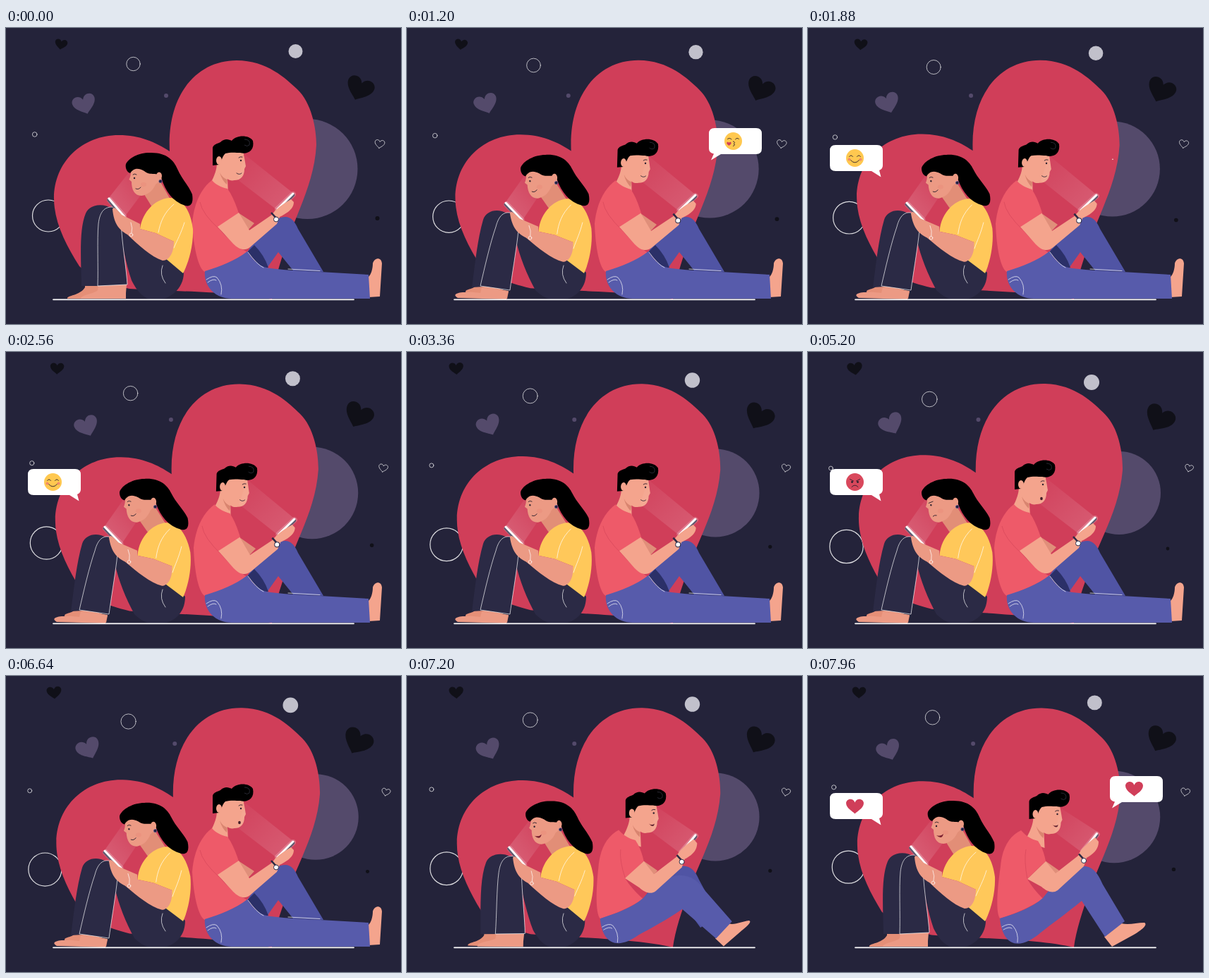
These frames come from a looping animation (560x420 px, 8 s). An HTML page:

```html
<!DOCTYPE html>
<html lang="en">
<head>
<meta charset="utf-8">
<title>Chatting couple</title>
<style>
  html, body { margin: 0; width: 100%; height: 100%; overflow: hidden; background: #24233a; }
  svg { display: block; width: 100vw; height: 100vh; }
  .line { fill: none; stroke: #fff; stroke-width: .8; stroke-linecap: round; stroke-opacity: .85; }
  .ink { fill: none; stroke: #2a1f2d; stroke-width: .9; stroke-linecap: round; }
  .skin { fill: #f4a48d; }
  .tan { fill: #ec9a84; }
  .navy { fill: #2b2a45; }
  .shirt { fill: #ee5a69; }
  .jeans { fill: #575bab; }
  .glow { stroke: #fff; stroke-width: 8; stroke-linecap: round; opacity: .22; }
  .edge { stroke: #615a70; stroke-width: 4.5; stroke-linecap: round; }
  .screen { stroke: #fff; stroke-width: 3; stroke-linecap: round; }
</style>
</head>
<body>
<svg viewBox="0 0 560 420">
  <defs>
    <path id="heart" d="M0 13C-4 9 -16 3 -16 -6C-16 -14 -4 -17 0 -7.500C4 -17 16 -14 16 -6C16 3 4 9 0 13Z"/>
    <linearGradient id="beamL" x1="0" y1="1" x2="1" y2="0">
      <stop offset=".2" stop-color="#fff" stop-opacity=".16"/><stop offset="1" stop-color="#fff" stop-opacity=".02"/>
    </linearGradient>
    <linearGradient id="beamR" x1="1" y1="1" x2="0" y2="0">
      <stop offset=".1" stop-color="#fff" stop-opacity=".15"/><stop offset="1" stop-color="#fff" stop-opacity=".02"/>
    </linearGradient>
    <circle id="face" r="12.500" fill="#ffc850"/>
  </defs>
  <rect width="560" height="420" fill="#24233a"/>

  <g id="drift"></g>
  <path id="bigHeart" fill="#d03e59" d="M232 175C228 95 270 46 327 46C370 46 397 72 413 87C433 106 440 142 440 166C437 220 412 262 398 305C388 335 380 360 377 385C330 374 240 374 175 370C140 362 118 352 104 338C85 308 68 275 68 242C68 190 108 152 160 152C190 152 212 162 232 175Z"/>

  <g id="man">
    <path id="farLeg" fill="#5054a4"/>
    <path id="legShade" fill="#2b3068" d="M342 318L352 308Q366 322 372 340L362 340Q352 330 342 318Z"/>
    <g id="manTop">
      <g id="manHead">
        <path class="skin" d="M305 174L336 174C338 184 339 190 340 196L338 200C338 210 333 216 324 216C320 217 316 216 314 214L315 236L287 226C297 208 299 200 299 190Z"/>
        <path fill="#d98570" d="M303 205Q307 213 314 215L313 222Q306 216 303 205Z"/>
        <path d="M293 195L293 170C294 165 300 164 304 162C310 156 316 158 320 160C326 152 344 151 350 160C353 174 342 180 332 177C326 177 318 176 311 178C306 182 306 190 302 194Z"/>
        <ellipse class="skin" cx="302" cy="188" rx="4" ry="6"/>
        <path d="M338 158Q347 158 345 166Q342 169 338 166" fill="none" stroke="#3a3a48" stroke-width=".7"/>
        <circle cx="333" cy="188" r="1.200" fill="#2a1f2d"/>
        <path class="ink" d="M330 184Q332 182 335 183"/>
        <path id="manSmile" class="ink" d="M327 206Q331 209 334 206"/>
        <ellipse id="manGasp" cx="331" cy="208" rx="1.800" ry="2.200" fill="#3a1520"/>
        <path id="manLaugh" fill="#5a1a28" d="M326 203Q330 206 334 203Q333 210 326 203Z"/>
      </g>
      <path id="farArm" fill="#e08f7a"/>
      <path id="shirt" class="shirt"/>
      <path id="sleeve" fill="none" stroke="#d94a5c" stroke-width=".8"/>
    </g>
    <path id="foot" class="skin"/>
    <path id="nearLeg" class="jeans"/>
    <path id="pocket" class="line"/>
    <path id="legLines" class="line" d="M343 318Q356 336 365 340M400 342L445 344.500"/>
    <g id="manArm">
      <path id="manBeam" fill="url(#beamR)"/>
      <g id="manPhone">
        <path class="glow" d="M385 257L407 236"/>
        <path class="edge" d="M386.500 258.500L407 237"/>
        <path class="screen" d="M385 257L407 235"/>
      </g>
      <path id="nearArm" class="skin"/>
      <g id="watch">
        <path d="M376 262L386 273" stroke="#2b2a45" stroke-width="2.600"/>
        <circle cx="383" cy="271.500" r="3.500" fill="#fff" stroke="#2b2a45"/>
      </g>
    </g>
  </g>

  <g id="girl">
    <path id="farFoot" fill="#e58f77"/>
    <path id="farShin" class="navy"/>
    <path id="nearFoot" class="tan"/>
    <path id="thigh" class="navy"/>
    <path id="nearShin" class="navy" stroke="#fff" stroke-width=".8" stroke-opacity=".85"/>
    <path class="line" d="M222 337Q217 350 226 362"/>
    <g id="girlTop">
      <path fill="url(#beamL)" d="M145 242L168 268L192 236L175 204Z"/>
      <path fill="#e28e77" d="M194 233L216 213L234 245L207 254Z"/>
      <path class="tan" d="M177 200C177 207 177 210 174.500 215L178 218C178 229 182 238 192 238C201 237 208 231 212 222L224 212L215 198Z"/>
      <path fill="#ffc85a" d="M190 285C193 262 210 243 232 241C252 241 262 262 265 285C266 310 258 335 251 348L225 326L238 303L212 291Z"/>
      <path class="line" d="M238 250C224 262 219 275 216 290M253 276C248 292 243 300 238 312"/>
      <g>
        <path class="glow" d="M147 244L167 267"/>
        <path class="edge" d="M145.500 244L166 268"/>
        <path class="screen" d="M146 242L168 268"/>
      </g>
      <path class="tan" d="M151 257C153 252 158 258 164 265L190 278L190 285L212 291L238 303C238 318 232 330 222 330C206 325 188 308 172 293C160 286 153 278 151 257Z"/>
      <path class="line" d="M177 276Q180 284 178 291"/><circle class="line" cx="177.500" cy="293.500" r="2.300"/>
      <path d="M176 206C170 204 169 196 170 193C174 184 190 176 206 177C228 177 238 188 243 200C249 214 258 222 264 236C266 249 262 254 254 252C236 246 226 232 220 212C215 203 205 211 196 203C186 197 180 200 176 206Z"/>
      <ellipse class="tan" cx="217" cy="210" rx="4" ry="5.500"/>
      <circle cx="219" cy="217.500" r="2.200" fill="#24233a" stroke="#575bab" stroke-width=".6"/>
      <circle cx="182" cy="213" r="1.200" fill="#2a1f2d"/>
      <ellipse cx="195" cy="222" rx="4" ry="3" fill="#e8806f" opacity=".25"/>
      <path id="girlBrow" class="ink" d="M180 208Q182 206 185 208"/>
      <path id="girlCross" class="ink" d="M179 210L185 208"/>
      <path id="girlSmile" class="ink" stroke="#a33b45" d="M184 228Q188 230 191 226"/>
      <path id="girlFlat" class="ink" d="M184 229Q186 227 189 228"/>
      <path id="girlLaugh" fill="#7a1f30" d="M182 226Q188 228 192 224Q190 233 182 226Z"/>
    </g>
  </g>

  <path d="M67 385.300H493" stroke="#fff" stroke-width="1.800" stroke-linecap="round"/>

  <g id="leftBubble">
    <path fill="#fff" d="M39 166H98Q106 166 106 174V195Q106 200 101 202L103.500 211.500L90 203H39Q31 203 31 195V174Q31 166 39 166Z"/>
    <g transform="translate(66.500 184.500)">
      <g id="happy">
        <use href="#face"/>
        <path class="ink" d="M-8 -2Q-5.500 -5.500 -3 -2M3 -2Q5.500 -5.500 8 -2M-6 3Q0 10 6 3"/>
        <circle cx="-8" cy="2" r="2" fill="#f28a68"/><circle cx="8" cy="2" r="2" fill="#f28a68"/>
      </g>
      <g id="angry">
        <circle r="12.500" fill="#d9485c"/>
        <path class="ink" d="M-7 -4L-2 -1.500M7 -4L2 -1.500M-4.500 7Q0 2 4.500 7"/>
        <circle cx="-4" cy="0" r="1.400" fill="#2a1f2d"/><circle cx="4" cy="0" r="1.400" fill="#2a1f2d"/>
      </g>
      <use id="loveL" href="#heart" y="1" transform="scale(.78)" fill="#d03e59"/>
    </g>
  </g>
  <g id="rightBubble">
    <path fill="#fff" d="M436 142H495Q503 142 503 150V171Q503 179 495 179H445L431 187.500L435 178.500Q428 177 428 171V150Q428 142 436 142Z"/>
    <g transform="translate(462.500 160.500)">
      <g id="kiss">
        <use href="#face"/>
        <path class="ink" d="M-8 -3Q-5 -5.500 -2.500 -2.500M3 -2.500Q5.500 -5.500 8 -3M0 0.500Q4 1.500 0.500 4Q4 5 0 7"/>
        <use href="#heart" transform="translate(-6 4) scale(.2)" fill="#d03e59"/>
      </g>
      <use id="loveR" href="#heart" transform="scale(.78)" fill="#d03e59"/>
    </g>
  </g>
</svg>
<script>
const LOOP = 8000, DRIFT = 5280;
const $ = id => document.getElementById(id);
const lerp = (a, b, k) => a + (b - a) * k;
const ramp = (t, from, to) => {
  const k = Math.min(1, Math.max(0, (t - from) / (to - from)));
  return k * k * (3 - 2 * k);
};
const show = (id, on) => { $(id).style.display = on ? '' : 'none'; };
const number = /-?\d+(\.\d+)?/g;
function mix(a, b, k) {
  const end = b.match(number);
  let i = 0;
  return a.replace(number, v => lerp(+v, +end[i++], k).toFixed(2) + ' ');
}

// Floating shapes: tag, paint, then [x, y, size, angle] at each end of the drift
const floaters = [
  ['circle', 'fill="#544a6b"', [427.5, 200, 71, 0], [441, 200, 59, 0]],
  ['circle', 'fill="#c1c0cb"', [410.5, 33, 10, 0], [402, 43, 11, 0]],
  ['circle', 'fill="#544a6b"', [227, 96, 3, 0], [241.5, 96, 3, 0]],
  ['circle', 'fill="#101018"', [526.5, 270, 3, 0], [510, 279, 2.4, 0]],
  ['circle', 'class="line"', [180.5, 51, 9.7, 0], [172.3, 67, 10.8, 0]],
  ['circle', 'class="line"', [40.7, 151, 3.3, 0], [32.4, 165, 2.9, 0]],
  ['circle', 'class="line" style="stroke-width:1.2"', [60, 266.5, 22.5, 0], [54.5, 276, 23.7, 0]],
  ['heart', 'fill="#101018"', [78, 23.5, .55, 10], [66.5, 24, .67, -8]],
  ['heart', 'fill="#101018"', [501, 87, 1.23, 22], [497.5, 95.5, 1.33, 28]],
  ['heart', 'fill="#544a6b"', [111.5, 109, 1.03, -18], [118.5, 103, 1.08, -26]],
  ['heart', 'class="line" vector-effect="non-scaling-stroke"', [529.7, 164.8, .43, 8], [540.2, 165, .37, 14]],
];
const heartPath = $('heart').getAttribute('d');
$('drift').innerHTML = floaters.map(([tag, paint]) =>
  tag === 'circle' ? `<circle ${paint}/>` : `<path d="${heartPath}" ${paint}/>`).join('');

// Girl: knees up, then feet slid forward
const girlPoses = {
  farShin: ['M107 366C106 320 104 285 113 263C118 250 138 248 150 256L158 300L140 366Z',
    'M92 368C97 330 100 300 108 272C112 259 128 255 142 263L155 300L125 366Z'],
  nearShin: ['M130 366C131 340 129 300 131 278C133 260 140 254 150 254C160 256 162 270 164 290C166 315 171 345 172 364Z',
    'M104 366C110 340 118 305 126 282C130 266 138 259 149 263C158 270 159 280 157 296C154 320 149 350 146 372Z'],
  thigh: ['M138 258C150 250 162 262 175 278L252 347C252 370 232 386 212 386C196 386 186 374 178 358C170 335 166 310 160 285Z',
    'M134 266C146 256 160 268 172 282L254 347C254 372 236 386 214 386C200 386 190 380 182 372C170 350 160 325 154 300Z'],
  farFoot: ['M112 357L131 360L131 378L130 384L87 384C86 379 105 380 112 368Z',
    'M98 359L106 362L144 374L142 384L84 376C80 370 92 372 97 366Z'],
  nearFoot: ['M131 365L171 364L170 376L170 384L106 384C107 378 124 378 130 372Z',
    'M106 368L144 373L142 379L141 385L72 383C60 376 80 373 104 376Z'],
};
// Man: leg stretched out, then knee bent
const manPoses = {
  farLeg: ['M342 318C360 290 378 268 396 268C404 268 410 275 414 285L450 346L407 344L386 318L369 342Z',
    'M333 316C352 290 368 272 388 270C402 269 409 278 414 290L440 340L418 360L388 318L350 340Z'],
  nearLeg: ['M282 345C305 338 325 330 342 317C352 332 362 340 375 341C400 344 425 345 445 346L514 350L516 384L400 384C380 384 350 384 320 384C295 384 280 365 282 345Z',
    'M272 344C298 336 318 328 333 315C352 292 368 272 388 270C404 269 411 280 418 296L449 348L421 370L388 319C365 338 345 352 330 364C300 390 276 384 272 344Z'],
  foot: ['M513 354C518 350 520 341 520 334C522 326 532 324 533 334L530 381L514 382Z',
    'M444 351C455 354 465 350 477 350C482 353 474 360 462 367L431 384L420 370Z'],
  pocket: ['M284 357Q294 350 299 354Q308 364 305 378M286 361Q294 355 298 358',
    'M275 356Q285 350 290 354Q299 364 297 378M277 360Q285 355 289 358'],
  shirt: ['M292 216C297 222 305 226 314 228C321 238 326 250 330 263L304 287C312 297 325 308 342 318C325 330 300 340 282 346C273 342 266 312 264 278C266 249 277 227 292 216Z',
    'M302 219C309 227 317 232 326 234C332 243 335 252 337 263L311 288C316 297 325 308 333 316C316 328 292 338 272 344C266 335 268 305 273 270C275 245 285 227 302 219Z'],
  sleeve: ['M275 247Q278 264 304 287L330 263', 'M309 246Q306 262 311 288L337 263'],
  farArm: ['M329 262L352 277L342 288Z', 'M336 262L356 276L348 284Z'],
  nearArm: ['M300 282L330 262L345 287L377 265C382 257 392 250 404 243L408 247C408 256 400 262 388 268L384 278L346 311C338 317 330 314 322 306Z',
    'M311 288L337 263L351 280L383 255C386 245 396 238 407 229L412 235C412 245 406 252 395 258L391 270L354 304C347 309 339 306 331 299Z'],
  manBeam: ['M384 258L408 235L339 180L328 215Z', 'M388 250L412 222L359 188L349 221Z'],
};
const pose = (poses, k) => {
  for (const id in poses) $(id).setAttribute('d', mix(...poses[id], k));
};
const move = (id, x, y, rest = '') => $(id).setAttribute('transform', `translate(${x} ${y}) ${rest}`);
const turn = (id, angle, x, y) => $(id).setAttribute('transform', `rotate(${angle} ${x} ${y})`);

function bubble(id, x, y, t, spans) {
  const size = Math.max(...spans.map(([on, off]) => ramp(t, on, on + 240) - ramp(t, off - 200, off)));
  move(id, x, y, `scale(${size}) translate(${-x} ${-y})`);
}

function draw(t) {
  const p = (1 - Math.cos(Math.PI * t / DRIFT)) / 2;
  floaters.forEach(([tag, , from, to], i) => {
    const [x, y, size, angle] = from.map((v, j) => lerp(v, to[j], p));
    const el = $('drift').children[i];
    if (tag === 'circle') el.setAttribute('r', size);
    el.setAttribute('transform', `translate(${x} ${y})` + (tag === 'heart' ? ` rotate(${angle}) scale(${size})` : ''));
  });
  turn('bigHeart', 1.6 * p, 365, 380);

  const slid = ramp(t, 200, 750) - ramp(t, 6800, 7350);
  pose(girlPoses, slid);
  turn('girlTop', -3.3 * slid, 252, 348);
  const cross = t > 3500 && t < 6100, loving = t > 7150;
  show('girlBrow', !cross);
  show('girlCross', cross);
  show('girlFlat', cross);
  show('girlSmile', !cross && !loving);
  show('girlLaugh', loving);

  const near = ramp(t, 200, 750) - ramp(t, 4400, 4900);
  const bent = ramp(t, 6800, 7350);
  pose(manPoses, bent);
  turn('manTop', 1.7 * near, 285, 345);
  turn('manArm', near, 285, 345);
  move('manHead', .5 * near + 20.5 * bent, 2.5 * near + 8 * bent);
  move('manPhone', 4 * bent, -10 * bent, `rotate(${-7 * bent} 396 247)`);
  move('watch', 8 * bent, -9.5 * bent);
  $('legShade').style.opacity = $('legLines').style.opacity = 1 - ramp(bent, 0, .4);
  const gasping = t > 4700 && t < 6900;
  show('manGasp', gasping);
  show('manSmile', !gasping && !loving);
  show('manLaugh', loving);

  bubble('rightBubble', 431, 187, t, [[640, 1900], [7200, 9000]]);
  bubble('leftBubble', 103, 211, t, [[1600, 3300], [4500, 6000], [7200, 9000]]);
  show('kiss', t < 4000);
  show('loveR', t >= 4000);
  show('happy', t < 4000);
  show('angry', t >= 4000 && t < 6500);
  show('loveL', t >= 6500);
}

const start = performance.now();
function tick() {
  draw((performance.now() - start) % LOOP);
  requestAnimationFrame(tick);
}
tick();
</script>
</body>
</html>
```
